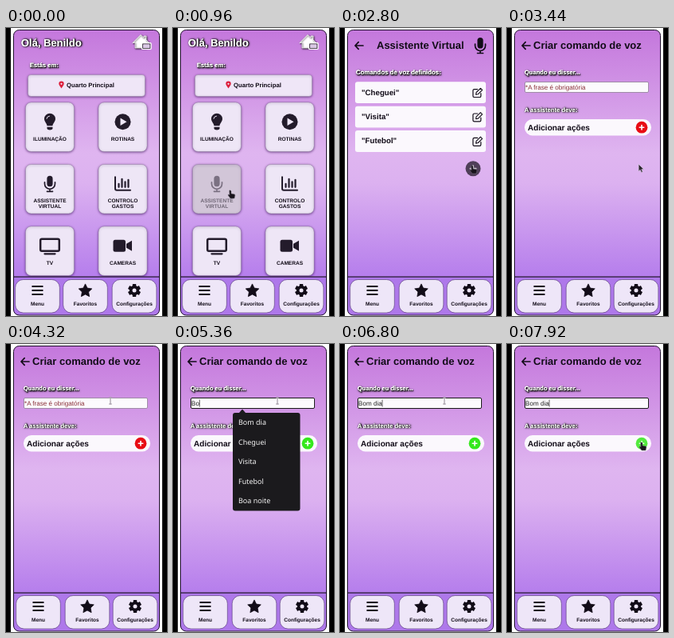
Animation of 202 by 360 pixels, one loop 8000 ms. Source, as an HTML page with a canvas:

```html
<!DOCTYPE html>
<html lang="pt">
<head>
<meta charset="utf-8">
<title>Casa inteligente</title>
<style>
html, body { margin: 0; width: 100%; height: 100%; overflow: hidden; background: #000; }
canvas { display: block; width: 202px; height: 360px; }
</style>
</head>
<body>
<canvas id="stage"></canvas>
<script>
const W = 202, H = 360, LOOP = 8000, STEP = 80;
const INK = '#120c18', SOFT = '#231b2b', CARD = '#eee6f6';
const SANS = '"Liberation Sans", Arial, sans-serif';
const canvas = document.getElementById('stage');
const ctx = canvas.getContext('2d');
const dpr = window.devicePixelRatio || 1;
canvas.width = W * dpr;
canvas.height = H * dpr;

// ---------- helpers ----------
function box(x, y, w, h, r, fill, stroke, line = 1) {
  ctx.beginPath();
  ctx.roundRect(x, y, w, h, r);
  if (fill) { ctx.fillStyle = fill; ctx.fill(); }
  if (stroke) { ctx.strokeStyle = stroke; ctx.lineWidth = line; ctx.stroke(); }
}
function disc(x, y, r, fill) {
  ctx.beginPath();
  ctx.arc(x, y, r, 0, 7);
  ctx.fillStyle = fill;
  ctx.fill();
}
function text(str, x, y, size, { color = INK, align = 'left', weight = 'bold', font = SANS } = {}) {
  ctx.font = `${weight} ${size}px ${font}`;
  ctx.textRendering = 'geometricPrecision';
  ctx.textAlign = align;
  ctx.fillStyle = color;
  ctx.fillText(str, x, y);
}
function shadow(dx, dy, blur, color, draw) {
  ctx.save();
  ctx.shadowColor = color;
  ctx.shadowOffsetX = dx * dpr;
  ctx.shadowOffsetY = dy * dpr;
  ctx.shadowBlur = blur * dpr;
  draw();
  ctx.restore();
}
function glowText(str, x, y, size) {
  for (const blur of [3, 2, 1]) {
    shadow(.8, .9, blur, '#000', () => text(str, x, y, size, { color: '#fff' }));
  }
}
function path(d, x, y, { fill, stroke, line = 1 } = {}) {
  ctx.save();
  ctx.translate(x, y);
  ctx.lineJoin = ctx.lineCap = 'round';
  const p = new Path2D(d);
  if (fill) { ctx.fillStyle = fill; ctx.fill(p, 'evenodd'); }
  if (stroke) { ctx.strokeStyle = stroke; ctx.lineWidth = line; ctx.stroke(p); }
  ctx.restore();
}
function faded(alpha, draw) {
  ctx.save();
  ctx.globalAlpha *= alpha;
  draw();
  ctx.restore();
}
const clamp = v => Math.max(0, Math.min(1, v));
const ramp = (t, a, b) => clamp((t - a) / (b - a));
const ease = p => p * p * (3 - 2 * p);

// ---------- icons, centred on x, y ----------
function bulb(x, y) {
  path('M-3.5 5C-3.5 2-7 0-7-4A7 6.5 0 0 1 7-4C7 0 3.5 2 3.5 5Z', x, y, { fill: SOFT });
  path('M-3.5 6.5H3.5V8C3.5 11-3.5 11-3.5 8Z', x, y, { fill: SOFT });
  path('M-4-4Q-3.5-7-.5-7.2', x, y, { stroke: CARD });
}
function play(x, y) {
  disc(x, y, 10, SOFT);
  path('M-3-4.8L5 0L-3 4.8Z', x, y, { fill: CARD });
}
function mic(x, y, color = SOFT) {
  box(x - 3.6, y - 10, 7.2, 13.5, 3.6, color);
  path('M-6.5-2V0A6.5 6.5 0 0 0 6.5 0V-2M0 6.5V9.5M-3.5 9.5H3.5', x, y, { stroke: color, line: 1.7 });
}
function chart(x, y) {
  path('M-9.5-8.5V6Q-9.5 8-7.5 8H9.5', x, y, { stroke: SOFT, line: 2 });
  path('M-5 4V0M-1 4V-6M3 4V-2.5M7 4V-5', x, y, { stroke: SOFT, line: 2.2 });
}
function tv(x, y) {
  box(x - 11.8, y - 8.5, 23.6, 15, 1.8, null, SOFT, 2.5);
  path('M-6.5 10H6.5', x, y, { stroke: SOFT, line: 2.3 });
}
function camera(x, y) {
  box(x - 12, y - 7.5, 15.5, 15, 2.5, SOFT);
  path('M4.5-2.5L11.5-6.5V6.5L4.5 2.5Z', x, y, { fill: SOFT });
}
function menu(x, y) {
  path('M-6.3-5H6.3M-6.3 0H6.3M-6.3 5H6.3', x, y, { stroke: INK, line: 1.9 });
}
function star(x, y) {
  ctx.beginPath();
  for (let i = 0; i < 10; i++) {
    const a = i * Math.PI / 5 - Math.PI / 2, r = i % 2 ? 4.3 : 8.7;
    ctx.lineTo(x + r * Math.cos(a), y + .6 + r * Math.sin(a));
  }
  ctx.closePath();
  ctx.fillStyle = ctx.strokeStyle = INK;
  ctx.lineJoin = 'round';
  ctx.lineWidth = .8;
  ctx.fill();
  ctx.stroke();
}
function gear(x, y) {
  ctx.save();
  ctx.translate(x, y);
  ctx.fillStyle = INK;
  for (let i = 0; i < 6; i++) {
    ctx.fillRect(-2.2, -8, 4.4, 5);
    ctx.rotate(Math.PI / 3);
  }
  ctx.restore();
  disc(x, y, 6.2, INK);
  disc(x, y, 2.5, '#eee6f8');
}
function house(x, y) {
  shadow(.6, .8, 2, '#000', () => {
    path('M-11 .5L-1-9.5L3-5.8V-8H6V-3L9.5 .5H6V7H-8V.5Z', x, y, { fill: '#fff', stroke: '#fff', line: .8 });
  });
  box(x + .5, y + .8, 11.5, 7.6, 1, '#1c1222', '#fff', 1.4);
  box(x + 2, y + 2.3, 8.5, 4.6, .5, '#d9c8e4');
}
function back(x, y) {
  path('M5 0H-5M-.8-4.3L-5 0L-.8 4.3', x, y, { stroke: INK, line: 1.7 });
}
function pencil(x, y) {
  path('M0-4.3H-4Q-5.6-4.3-5.6-2.8V4Q-5.6 5.6-4 5.6H2.8Q4.3 5.6 4.3 4V.8', x, y, { stroke: INK, line: 1.2 });
  path('M-2 2.4L-1.5-.4L3.8-5.6L6-3.4L.8 1.8Z', x, y, { stroke: INK, line: 1.1 });
}
function plus(x, y, r, color) {
  disc(x, y, r, color);
  const k = r * .37;
  path(`M${-k} 0H${k}M0 ${-k}V${k}`, x, y, { stroke: '#fff', line: r * .22 });
}

// ---------- shell ----------
function backdrop() {
  ctx.fillStyle = '#000';
  ctx.fillRect(0, 0, W, H);
  ctx.fillStyle = '#fff';
  ctx.fillRect(6, 0, 190, H);
  const g = ctx.createLinearGradient(0, 2, 0, 312);
  g.addColorStop(0, '#c477dc');
  g.addColorStop(.5, '#dfb5f0');
  g.addColorStop(.62, '#dcb1f0');
  g.addColorStop(1, '#b57dec');
  box(9.5, 2.5, 183, 356.5, 7, g);
}
function navBar(home) {
  ctx.save();
  ctx.beginPath();
  ctx.roundRect(9.5, 2.5, 183, 356.5, 7);
  ctx.clip();
  ctx.fillStyle = '#ae78ea';
  ctx.fillRect(9, 311, 184, 49);
  ctx.fillStyle = INK;
  ctx.fillRect(9, 310.5, 184, 1.1);
  ctx.restore();
  const items = [[40.5, 'Menu', menu], [102, 'Favoritos', star], [162, 'Configurações', gear]];
  items.forEach(([cx, label, icon], i) => {
    const x = cx - (home ? [1, 2.5, 1][i] : 0);
    box(x - 27.8, 314.5, 55.6, 41.5, 10, '#eee6f8', 'rgba(50,25,80,.6)', .8);
    icon(x, 328);
    text(label, x, 347, 6.5, { align: 'center' });
  });
  box(9.5, 2.5, 183, 356.5, 7, null, '#1c0f28', 1);
}

// ---------- screens ----------
const cards = [
  [['ILUMINAÇÃO'], bulb], [['ROTINAS'], play],
  [['ASSISTENTE', 'VIRTUAL'], mic], [['CONTROLO', 'GASTOS'], chart],
  [['TV'], tv], [['CAMERAS'], camera]
];
function panel(x, y, w, h, r, fill) {
  shadow(0, .8, 3, 'rgba(40,0,70,.6)', () => box(x, y, w, h, r, fill, 'rgba(140,120,155,.6)', .7));
}
function homeScreen(t) {
  glowText('Olá, Benildo', 19, 22.5, 13);
  house(170, 18);
  glowText('Estás em:', 30, 49, 7.6);
  panel(27.5, 58.5, 147, 27, 4, '#efe6f7');
  path('M0 4.5C-2 1.5-3.2.3-3.2-1.2A3.2 3.2 0 0 1 3.2-1.2C3.2.3 2 1.5 0 4.5Z', 69.5, 71, { fill: '#dc1f3c' });
  disc(69.5, 69.8, 1.1, '#efe6f7');
  text('Quarto Principal', 76, 73.5, 7.7);
  cards.forEach(([lines, icon], i) => {
    const x = i % 2 ? 116 : 24.5, y = 93 + 77.5 * (i >> 1), cx = x + 30.5;
    const pressed = i === 2 && t >= 880;
    panel(x, y, 61, 61.5, 7, pressed ? '#d2c6d8' : CARD);
    faded(pressed ? .5 : 1, () => {
      icon(cx, y + 24.3);
      lines.forEach((s, n) => text(s, cx, y + 47.5 + n * 7.4, 6.55, { align: 'center' }));
    });
  });
}
function assistantScreen(t) {
  back(24, 22);
  text('Assistente Virtual', 46, 26.3, 13);
  mic(176, 22, INK);
  glowText('Comandos de voz definidos:', 20, 58, 7.85);
  ['Cheguei', 'Visita', 'Futebol'].forEach((s, i) => {
    const y = 67.3 + i * 30.4;
    box(19, y, 164, 26.8, 3, '#fbf8fd');
    text(`"${s}"`, 27, y + 16.2, 9.7);
    pencil(172.5, y + 13.6);
  });
  faded(t >= 2720 ? .68 : 1, () => plus(167, 175.7, 9.5, '#0c0810'));
}
const typed = [[4960, 'B'], [5360, 'Bo'], [5600, 'Bom'], [5760, 'Bom '], [6000, 'Bom d'], [6400, 'Bom di'], [6560, 'Bom dia']];
const FOCUS = 4400;
function suggestions(items, alpha) {
  if (alpha <= 0) return;
  faded(alpha, () => {
    path('M-4.5 5L0 0L4.5 5Z', 87, 81.5, { fill: '#1b1a1d' });
    box(75, 86, 84.5, items.length * 24.5, 3, '#1b1a1d');
    items.forEach((s, i) => text(s, 82, 101.3 + i * 24.5, 9, {
      color: '#f4f4f4', weight: 500, font: '"Noto Sans", "Open Sans", sans-serif'
    }));
  });
}
function createScreen(t) {
  back(24, 22);
  text('Criar comando de voz', 33, 26.3, 13);
  glowText('Quando eu disser...', 22, 58, 7.55);
  glowText('A assistente deve:', 22, 104.5, 7.6);

  const focused = t >= FOCUS;
  box(22.5, 67.5, 155, 13, 1.5, '#fcfafd', focused ? '#1a1a1a' : '#8d7d95', focused ? 1 : .8);
  const last = typed.filter(([at]) => at <= t).pop();
  const value = last ? last[1] : '';
  if (value) text(value, 23, 77, 8.1, { weight: 'normal', color: '#222' });
  else text('*A frase é obrigatória', 23, 77, 8.1, { weight: 'normal', color: '#8a3038' });
  const since = t - (last ? last[0] : FOCUS);
  if (focused && Math.floor(since / 500) % 2 === 0) {
    ctx.font = `8.1px ${SANS}`;
    ctx.fillStyle = '#222';
    ctx.fillRect(23 + ctx.measureText(value).width, 69.5, .7, 9);
  }

  box(22, 114, 159, 20.5, 10, '#fbf8fd');
  text('Adicionar ações', 26, 127.5, 10.1);
  faded(t >= 7840 ? .85 : 1, () => plus(169, 124.2, 7.4, value ? '#35e81c' : '#e80c14'));

  if (t < 5440) suggestions(['Bom dia', 'Cheguei', 'Visita', 'Futebol', 'Boa noite'], ramp(t, 4320, 4560));
  else suggestions(['Bom dia'], 1 - ramp(t, 6480, 6800));
}

// ---------- pointer ----------
const moves = [
  [80, 100, 352], [480, 97, 262], [880, 72, 204], [1200, 72, 204], [1600, 62, 198],
  [2160, 62, 198], [2720, 166, 173], [3360, 166, 173], [4240, 131, 71],
  [7360, 131, 71], [7840, 169, 124], [8000, 169, 124]
];
function pointerAt(t) {
  const i = Math.max(1, moves.findIndex(m => m[0] >= t));
  const [t0, x0, y0] = moves[i - 1], [t1, x1, y1] = moves[i];
  const p = ease(ramp(t, t0, t1));
  return [x0 + (x1 - x0) * p, y0 + (y1 - y0) * p];
}
function pointer(t) {
  if (t < 80) return;
  const [x, y] = pointerAt(t);
  const hand = (t >= 800 && t < 1200) || (t >= 2720 && t < 3200) || t >= 7760;
  const beam = t >= 4160 && t < 7440;
  if (beam) {
    path('M-1.2-4H1.2M0-4V4M-1.2 4H1.2', x, y, { stroke: '#aaa3ad', line: 1.3 });
  } else if (hand) {
    path('M-1.2-1Q0-2 1 0V3L5 3.8Q6 4 5.8 5.5L5 9H0L-3 5Q-3 3.5-1.2 4.5Z', x, y, { fill: '#17131a', stroke: '#77717c', line: .5 });
  } else {
    path('M0 0V8.5L2 6.6L3.5 9.8L5 9.1L3.6 6H6.2Z', x, y, { fill: '#2a252d', stroke: '#d8cfdd', line: .5 });
  }
}

function draw(now) {
  const t = Math.floor((now % LOOP) / STEP) * STEP;
  ctx.setTransform(dpr, 0, 0, dpr, 0, 0);
  backdrop();
  const home = t < 1200;
  if (home) homeScreen(t);
  else if (t < 3200) assistantScreen(t);
  else createScreen(t);
  navBar(home);
  pointer(t);
}
const start = performance.now();
function tick() {
  draw(performance.now() - start);
  requestAnimationFrame(tick);
}
tick();
</script>
</body>
</html>
```
